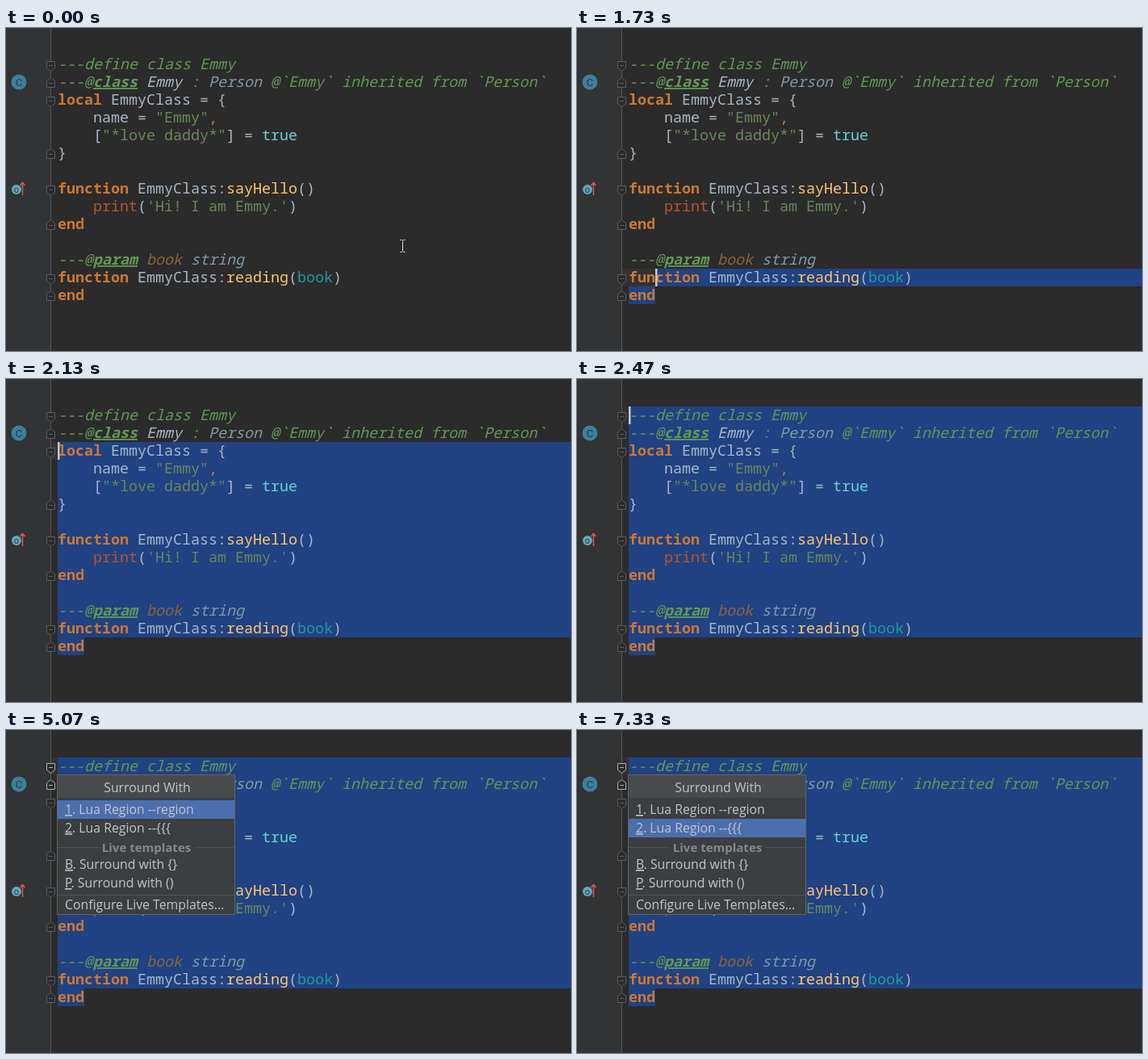
These frames come from a looping animation (700 px wide and 400 px high, 8000 ms). An HTML page:

```html
<!DOCTYPE html>
<html lang="en">
<head>
<meta charset="utf-8">
<title>Surround with region</title>
<style>
html, body { margin: 0; width: 100%; height: 100%; overflow: hidden; background: #2b2b2b; }
svg { display: block; }
text { white-space: pre; }
#code { font: 18.333px "Noto Sans Mono", "DejaVu Sans Mono", monospace; font-variant-ligatures: none; fill: #a9b7c6; }
.k { fill: #cc7832; font-weight: bold; }
.match .m { fill: #ffef28; }
.d, .t, .c, .p, .tag { font-style: italic; }
.d, .tag { fill: #629755; }
.tag { font-weight: bold; text-decoration: underline; }
.t { fill: #7f9aa5; }
.p { fill: #8a653b; }
.s { fill: #6a8759; }
.o { fill: #cc7832; }
.f { fill: #ffc66d; }
.g { fill: #b9532e; }
.b { fill: #67d3d3; }
.a { fill: #20999d; }
.fold { fill: #2b2b2b; stroke: #5b5d5e; }
.hover .hot { stroke: #b0b0b0; }
#popup { font: 15.8px "Open Sans", "Noto Sans", sans-serif; fill: #c3c5c6; }
#popup .u { text-decoration: underline; }
#menu { font: 16px "Noto Sans CJK SC", "Noto Sans CJK", sans-serif; fill: #bbb; }
</style>
</head>
<body>
<svg id="stage" width="700" height="400" viewBox="0 0 700 400">
  <rect width="700" height="400" fill="#2b2b2b"/>
  <rect id="line" x="56" width="644" height="22" fill="#323232"/>
  <rect width="55" height="400" fill="#313335"/>
  <path d="M55.5 0V400" stroke="#555"/>
  <path id="sel" fill="#214283"/>
  <path id="braces" d="M64 298h88v22h-88zM64 320h33v22h-33z" fill="#3b514d"/>
  <g id="folds"></g>
  <g font-family="Roboto, sans-serif" text-anchor="middle">
    <circle cx="16" cy="67" r="9.5" fill="#3d809a"/>
    <text x="16" y="71.5" font-size="13" fill="#263a43">C</text>
    <circle cx="13" cy="200" r="6" fill="#62a5bd"/>
    <text x="13" y="203.5" font-size="11" fill="#263a43">o</text>
    <path d="M20.5 207V192M17.5 195L20.5 191.5L23.5 195" fill="none" stroke="#e0584c" stroke-width="1.5"/>
  </g>
  <g id="code"></g>
  <rect id="caret" width="2.5" height="22" fill="#c8c8c8"/>
  <path id="mouse" d="M-3 -7.5H-1L0 -6.5L1 -7.5H3M0 -6.5V6.5M-3 7.5H-1L0 6.5L1 7.5H3" fill="none" stroke="#ddd"/>
  <g id="bulb">
    <path d="M77 27C77 25 74 24 74 20.5A6.4 6.4 0 0 1 87 20.5C87 24 84 25 84 27Z" fill="#f4af3d"/>
    <path d="M77 28.5h7v2h-7zM78 31.5h5v1.5h-5z" fill="#a5a7a8"/>
  </g>
  <g id="menu">
    <path d="M0 0H20.5V317.5H0" fill="#3c3f41" stroke="#565859"/>
    <path d="M0 94.5H20M0 260.5H20" stroke="#565859"/>
    <path d="M0 3.5H6M0 25.5H2M4.5 20V31" stroke="#bbb" fill="none"/>
    <path d="M0 47.5C7 47.5 7 58.5 0 58.5" stroke="#999" fill="none"/>
  </g>
  <g id="popup">
    <rect x="63.5" y="55.5" width="220" height="173" fill="#3c3f41" stroke="#616365"/>
    <rect x="64" y="56" width="219" height="28" fill="#484b4d"/>
    <rect id="pick" x="64" width="219" height="23" fill="#4b6eaf"/>
    <path d="M64 145.5H115M233 145.5H283M64 204.5H283" stroke="#515456"/>
    <text x="175" y="76.500" text-anchor="middle">Surround With</text>
    <text x="174" y="150.500" text-anchor="middle" font-size="15" font-weight="bold" fill="#85878a">Live templates</text>
    <text x="73" y="221.500">Configure Live Templates...</text>
  </g>
</svg>
<script>
const $ = id => document.getElementById(id);
const esc = s => s.replace(/&/g, '&amp;').replace(/</g, '&lt;');
const rowY = row => 34 + 22 * row;
const colX = col => 64 + 11 * col;

// Each row alternates style and text.
const rows = [
  ['d', '---define class Emmy'],
  ['d', '---@', 'tag', 'class', 'c', ' Emmy', 'd', ' : ', 't', 'Person', 'd', ' @`Emmy` inherited from `Person`'],
  ['k', 'local', '', ' EmmyClass = {'],
  ['', '    name = ', 's', '"Emmy"', 'o', ','],
  ['', '    [', 's', '"*love daddy*"', '', '] = ', 'b', 'true'],
  ['', '}'],
  [],
  ['k', 'function', '', ' EmmyClass:', 'f', 'sayHello', '', '()'],
  ['g', '    print', '', '(', 's', "'Hi! I am Emmy.'", '', ')'],
  ['k', 'end'],
  [],
  ['d', '---@', 'tag', 'param', 'p', ' book', 't', ' string'],
  ['k m', 'function', '', ' EmmyClass:', 'f', 'reading', '', '(', 'a', 'book', '', ')'],
  ['k m', 'end']
];
$('code').innerHTML = rows.map((row, i) => {
  let spans = '';
  for (let j = 0; j < row.length; j += 2) spans += `<tspan class="${row[j]}">${esc(row[j + 1])}</tspan>`;
  return `<text x="64" y="${rowY(i) + 17}">${spans}</text>`;
}).join('');

// Fold markers alternate between pointing down and up.
$('folds').innerHTML = [47, 67, 91, 155, 201, 243, 311, 331].map((y, i) => {
  const s = i % 2 ? -1 : 1;
  return `<path class="fold ${i < 2 ? 'hot' : ''}" transform="translate(55.5 ${y + .5}) scale(1 ${s})"
    d="M-5 -6H5V2L0 6L-5 2ZM-2.500 -1H2.500"/>`;
}).join('');

$('menu').innerHTML += [112, 138, 165, 191, 219, 246].map((y, i) =>
  `<text x="-9" y="${y + 5}" fill="${i == 2 || i == 3 ? '#777' : '#bbb'}">来</text>`).join('');

$('popup').innerHTML += [
  [104, '1', 'Lua Region --region'], [127, '2', 'Lua Region --{{{'],
  [172, 'B', 'Surround with {}'], [195, 'P', 'Surround with ()']
].map(([y, key, label]) =>
  `<text x="73" y="${y}"><tspan class="u">${key}</tspan>. ${label}</text>`).join('');

// Caret: time, row, column
const carets = [
  [1400, 13, 3], [1730, 12, 3], [1800, 10, 0], [1870, 7, 2], [1930, 6, 0],
  [2000, 5, 1], [2060, 3, 0], [2130, 2, 0], [2270, 1, 0], [2470, 0, 0]
];

function show(id, on) { $(id).style.display = on ? '' : 'none'; }

function draw(t) {
  const step = t < 70 ? 0 : Math.floor((t - 70) / 65.7) + 1;
  show('mouse', t < 530);
  const k = Math.min(step, 7) / 7;
  $('mouse').setAttribute('transform', `translate(${Math.round(491 - 429 * k) + .5} ${Math.round(270 - 62 * k)})`);

  const caret = carets.filter(c => c[0] <= t).pop();
  show('line', caret);
  show('caret', caret && t < 3930);
  show('sel', caret && caret[1] < 13);
  if (caret) {
    const x = colX(caret[2]), y = rowY(caret[1]);
    $('line').setAttribute('y', y);
    $('caret').setAttribute('x', x);
    $('caret').setAttribute('y', y);
    $('sel').setAttribute('d', `M${x} ${y}H700V320H97V342H64V${y + 22}H${x}Z`);
  }

  const match = t >= 1400 && t < 1730;
  show('braces', match);
  $('stage').classList.toggle('match', match);
  $('stage').classList.toggle('hover', t >= 3530);
  show('bulb', t >= 3270 && t < 5070);
  show('menu', t >= 4200 && t < 5070);
  show('popup', t >= 5070);
  const second = t >= 6670 && t < 7130 || t >= 7330;
  $('pick').setAttribute('y', second ? 110 : 87);
}

const start = performance.now();
function tick() {
  draw((performance.now() - start) % 8000);
  requestAnimationFrame(tick);
}
tick();
</script>
</body>
</html>
```
